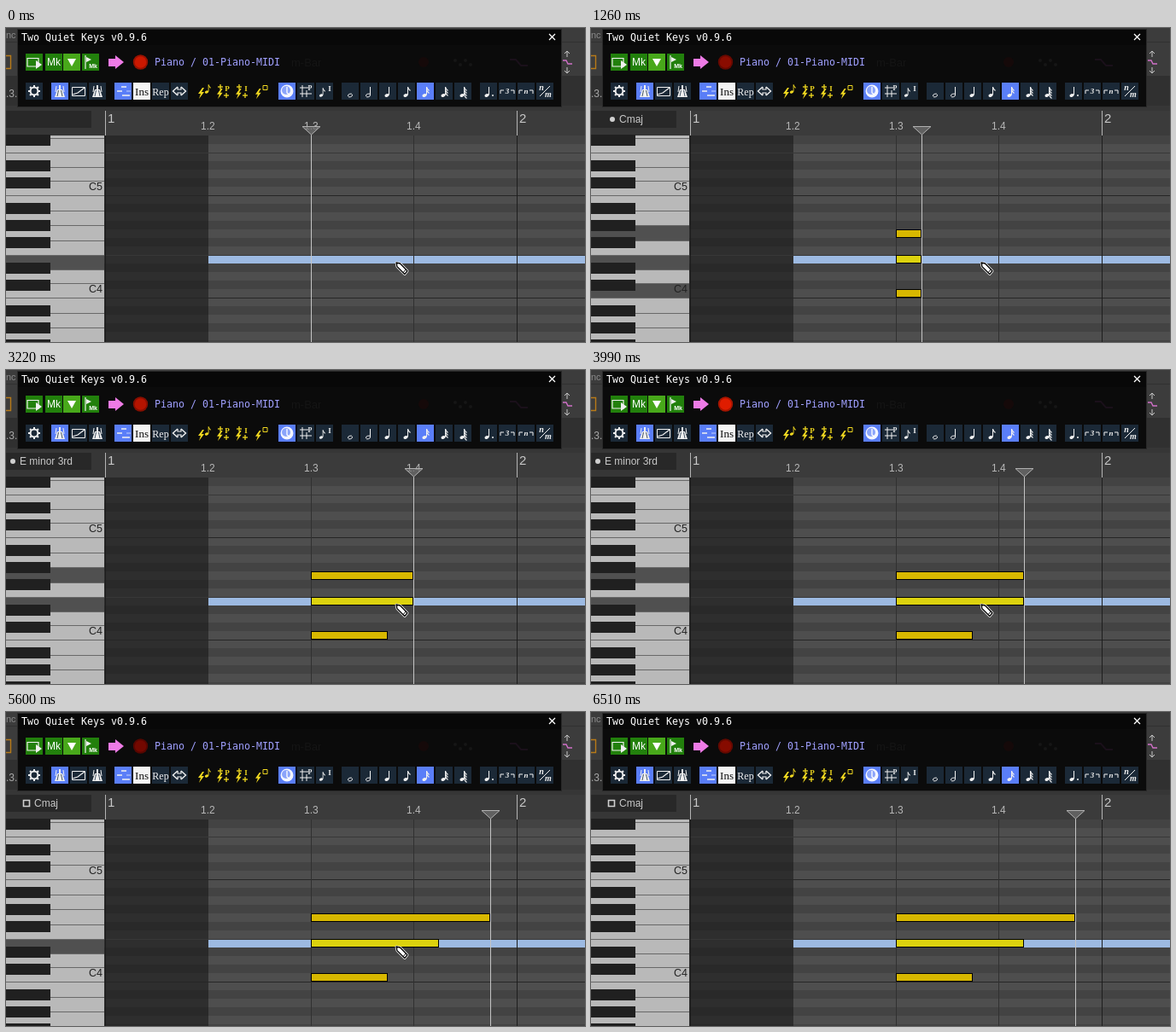
An HTML page with a canvas that plays this animation: 678 by 368 pixels, repeating every 6580 ms.

```html
<!DOCTYPE html>
<html lang="en">
<head>
<meta charset="utf-8">
<title>Step input</title>
<style>
html, body { margin: 0; width: 100%; height: 100%; overflow: hidden; background: #333; }
canvas { display: block; width: 678px; height: 368px; }
</style>
</head>
<body>
<canvas id="stage" width="678" height="368"></canvas>
<script>
const W = 678, H = 368, LOOP = 6580;
const ctx = document.getElementById('stage').getContext('2d');
const SANS = '"Liberation Sans", Arial, sans-serif';
const MONO = '"DejaVu Sans Mono", monospace';
const SERIF = '"Liberation Serif", serif';
const NAVY = '#1b2937', BLUE = '#5a7ef8', INK = '#f0f0f0', YELLOW = '#f0d820';

// The play head advances at a steady rate while keys are held
const FIRST_STEP = 1220, STEP_MS = 640, STEP_COUNT = 7;
const PRESS = 1050, RELEASE_C = 2800, RELEASE_E = 4940, RELEASE_G = 5500;
const STEP_W = 30, START_X = 357, ROLL_Y = 126, KEYS_W = 115, ITEM_X = 237;

const isBlack = p => [1, 3, 6, 8, 10].includes(((p % 12) + 12) % 12);
const rowY = p => 306 - (p - 60) * 10;

function rect(x, y, w, h, color) {
  ctx.fillStyle = color;
  ctx.fillRect(x, y, w, h);
}

function text(s, x, y, font, color, align = 'left') {
  ctx.font = font;
  ctx.fillStyle = color;
  ctx.textAlign = align;
  ctx.fillText(s, x, y);
}

function path(pts, close) {
  ctx.beginPath();
  for (let i = 0; i < pts.length; i += 2) ctx.lineTo(pts[i], pts[i + 1]);
  if (close) ctx.closePath();
}

function fill(pts, color) {
  path(pts, true);
  ctx.fillStyle = color;
  ctx.fill();
}

function line(pts, color = INK, width = 1.3, close = false) {
  path(pts, close);
  ctx.strokeStyle = color;
  ctx.lineWidth = width;
  ctx.stroke();
}

function disc(x, y, r, color) {
  ctx.beginPath();
  ctx.arc(x, y, r, 0, Math.PI * 2);
  ctx.fillStyle = color;
  ctx.fill();
}

function ring(x, y, r, color, width) {
  ctx.beginPath();
  ctx.arc(x, y, r, 0, Math.PI * 2);
  ctx.strokeStyle = color;
  ctx.lineWidth = width;
  ctx.stroke();
}

const button = (x, y, color) => rect(x, y, 20, 20, color);

function noteIcon(x, y, { open = false, stem = true, flags = 0, size = 1, color = INK } = {}) {
  ctx.save();
  ctx.translate(x, y);
  ctx.scale(size, size);
  ctx.beginPath();
  ctx.ellipse(0, 0, 2.6, 1.8, -0.35, 0, Math.PI * 2);
  ctx.fillStyle = ctx.strokeStyle = color;
  ctx.lineWidth = 1;
  if (open) ctx.stroke(); else ctx.fill();
  if (stem) line([2.5, -0.5, 2.5, -10], color, 1);
  for (let i = 0; i < flags; i++) {
    ctx.beginPath();
    ctx.moveTo(2.5, -10 + i * 3);
    ctx.quadraticCurveTo(3, -7.5 + i * 3, 5.5, -5.5 + i * 3);
    ctx.lineWidth = 1.2;
    ctx.stroke();
  }
  ctx.restore();
}

function bolt(x, y, s) {
  fill([x + 5 * s, y, x, y + 7 * s, x + 3 * s, y + 7 * s, x + s, y + 13 * s,
    x + 7 * s, y + 5 * s, x + 4 * s, y + 5 * s, x + 7 * s, y], YELLOW);
}

function plus(x, y, color) {
  line([x - 3, y, x + 3, y], color, 1.3);
  line([x, y - 3, x, y + 3], color, 1.3);
}

function pedal(x, y) {
  fill([x + 7, y + 8, x + 13, y + 8, x + 16, y + 17, x + 4, y + 17], INK);
  line([x + 10, y + 3, x + 10, y + 8], INK, 2);
  line([x + 6, y + 4, x + 5, y + 11], INK, 1);
  line([x + 14, y + 4, x + 15, y + 11], INK, 1);
  line([x + 8.5, y + 9, x + 7, y + 16], '#456', 1);
  line([x + 11.5, y + 9, x + 13, y + 16], '#456', 1);
}

function backdrop() {
  rect(0, 0, W, 97, '#3c3c3c');
  rect(0, 16, W, 1, '#303030');
  rect(0, 56, W, 36, '#303030');
  rect(0, 91, W, 6, '#363636');
  text('nc', 0, 12, '11px ' + SANS, '#8a8a8a');
  line([0, 32.5, 5.5, 32.5, 5.5, 47.5, 0, 47.5], '#b87a18', 1.4);
  text('.3.0', 0, 81, '12px ' + SANS, '#a8a8a8');
  line([657, 27, 657, 34], '#c8c8c8', 1);
  line([654, 30, 657, 27, 660, 30], '#c8c8c8', 1);
  line([657, 46, 657, 53], '#c8c8c8', 1);
  line([654, 50, 657, 53, 660, 50], '#c8c8c8', 1);
  line([652, 38, 656, 38, 658, 42, 663, 42], '#d070c8', 1.4);
}

function topRow(t) {
  const green = '#22800c', bright = '#48a81a';
  button(23, 30, green);
  line([25, 35.5, 38, 35.5, 38, 45, 25, 45], INK, 1.2, true);
  fill([35, 38, 42, 43, 35, 48], INK);
  button(46, 30, green);
  text('Mk', 56, 44, '12px ' + SANS, '#fff', 'center');
  button(67, 30, bright);
  fill([72, 36, 82, 36, 77, 45], '#fff');
  button(89, 30, green);
  line([93, 32, 93, 48], INK, 1.2);
  fill([94, 34, 100, 37, 94, 40], INK);
  text('Mk', 102, 47, 'bold 7px ' + SANS, '#fff', 'center');
  fill([120, 36, 128, 36, 128, 32, 138, 40, 128, 48, 128, 45, 120, 45], '#ee7be6');

  const glow = 0.5 + 0.5 * Math.cos((t - 895) / 1047 * Math.PI * 2);
  const red = k => `rgb(${k * (115 + 110 * glow)}, ${k * (8 + 20 * glow)}, 0)`;
  disc(157.5, 40, 8.7, red(0.75));
  disc(157.5, 40, 6.8, red(1));
  text('Piano / 01-Piano-MIDI', 174, 44, '11.63px ' + MONO, '#a0a0ff');
}

function toolRow() {
  const y = 64;
  for (const x of [23, 75, 97, 171, 193, 341, 363, 393, 415, 437, 459, 503, 525, 555, 577, 599, 621])
    button(x, y, NAVY);
  for (const x of [53, 127, 319, 481]) button(x, y, BLUE);
  button(149, y, '#f4f4f4');

  ring(33, 74, 4.4, INK, 2);
  for (let i = 0; i < 8; i++) {
    const c = Math.cos(i * Math.PI / 4), s = Math.sin(i * Math.PI / 4);
    line([33 + c * 5, 74 + s * 5, 33 + c * 7, 74 + s * 7], INK, 2);
  }

  pedal(53, y);
  line([77.5, 69.5, 92.5, 69.5, 92.5, 79.5, 77.5, 79.5], INK, 1, true);
  line([78, 78, 84, 76, 92, 70], INK, 1.2);
  pedal(97, y);

  line([130, 74, 136, 74], INK, 1.5);
  line([135, 69, 141, 69], INK, 1.5);
  line([136, 79, 145, 79], INK, 1.5);
  line([141, 74, 146, 74], '#c4d0ff', 1);
  text('Ins', 159, 79, '13px ' + SERIF, '#111', 'center');
  text('Rep', 181, 79, '12px ' + SERIF, INK, 'center');
  line([201, 69, 195.5, 74, 201, 79], INK, 1.4);
  line([205, 69, 210.5, 74, 205, 79], INK, 1.4);
  line([201, 69, 201, 72, 205, 72, 205, 69], INK, 1.2);
  line([201, 79, 201, 76, 205, 76, 205, 79], INK, 1.2);

  bolt(225, 70, 1);
  noteIcon(235, 75, { flags: 1, size: 0.85, color: YELLOW });
  for (const [x, s] of [[247, 'P'], [269, 'I']]) {
    bolt(x, 71, 0.95);
    plus(x + 4, 69, YELLOW);
    text(s, x + 12, 74, 'bold 9px ' + SERIF, YELLOW, 'center');
    plus(x + 11, 79, YELLOW);
  }
  bolt(292, 71, 0.95);
  line([301, 67.5, 306, 67.5, 306, 72.5, 301, 72.5], YELLOW, 1, true);

  disc(329, 74, 7.5, '#f4f6ff');
  disc(328, 73, 5, '#8ba4fa');
  line([329, 69, 329, 76, 332, 78], '#fff', 1.3);
  line([344, 70, 354, 70], INK, 1);
  line([344, 77, 358, 77], INK, 1);
  line([347, 67, 347, 81], INK, 1);
  line([352, 73, 352, 81], INK, 1);
  text('P', 356, 73, 'bold 8px ' + SERIF, INK, 'center');
  noteIcon(369, 79, { flags: 1, size: 0.85 });
  text('I', 379, 74, 'bold 9px ' + SERIF, INK, 'center');

  noteIcon(403, 79, { open: true, stem: false });
  noteIcon(424, 79, { open: true });
  for (let i = 0; i < 5; i++) noteIcon(446 + i * 22, 79, { flags: i });
  noteIcon(563, 79);
  disc(570, 79, 1, INK);
  for (const [x, s] of [[577, '3'], [599, 'n']]) {
    line([x + 2, 77, x + 2, 73, x + 6, 73], INK, 1);
    line([x + 14, 73, x + 18, 73, x + 18, 77], INK, 1);
    text(s, x + 10, 77, 'italic bold 9px ' + SERIF, INK, 'center');
  }
  text('n', 627, 73, 'italic bold 10px ' + SERIF, INK, 'center');
  text('m', 635, 81, 'italic bold 10px ' + SERIF, INK, 'center');
  line([625, 80, 637, 68], INK, 1);
}

function toolWindow(t) {
  rect(13, 1, 638, 92, '#292929');
  rect(14, 2, 636, 90, '#0b0b0b');
  rect(14, 2, 636, 18, '#080808');
  text('m-Bar', 334, 45, '13px ' + SANS, '#151515');
  disc(489, 40, 6, '#150909');
  for (let i = 0; i < 4; i++) disc(526 + i * 6, 38 + (i % 2) * 5, 2, '#161616');
  line([590, 37, 597, 37, 603, 44, 611, 44], '#1a101a', 2);
  text('Two Quiet Keys v0.9.6', 18, 15, '11.63px ' + MONO, '#fff');
  line([636, 7, 643, 14], '#fff', 1.3);
  line([643, 7, 636, 14], '#fff', 1.3);
  topRow(t);
  toolRow();
}

function ruler(t) {
  rect(0, 97, W, ROLL_Y - 97, '#3b3b3b');
  rect(0, 93, 116, ROLL_Y - 93, '#363636');
  rect(0, 97, 100, 20, '#282828');
  rect(116, 97, 1, 29, '#b4b4b4');
  rect(598, 97, 1, 29, '#b4b4b4');
  text('1', 119, 111, '15px ' + SANS, '#c8c8c8');
  text('2', 601, 111, '15px ' + SANS, '#c8c8c8');
  ['1.2', '1.3', '1.4'].forEach((s, i) =>
    text(s, [228, 349, 469][i], 119, '12px ' + SANS, '#b8b8b8'));

  if (t < PRESS) return;
  const released = t >= RELEASE_E;
  const third = t >= RELEASE_C && !released;
  if (released) line([20.5, 103.5, 27.5, 103.5, 27.5, 110.5, 20.5, 110.5], '#d0d0d0', 1.6, true);
  else disc(third ? 8 : 25, 107, 3, '#d0d0d0');
  text(third ? 'E minor 3rd' : 'Cmaj', third ? 16 : 33, 111, '12px ' + SANS, '#c8c8c8');
}

// Pitches lit on the keyboard: the hovered one and the held ones
function litKeys(t) {
  const keys = [];
  if (t < 6090) keys.push(64);
  else if (t < 6230) keys.push(62);
  if (t >= PRESS && t < RELEASE_C) keys.push(60);
  if (t >= PRESS && t < RELEASE_G) keys.push(67);
  return keys;
}

// White keys share C–E (50 px) and F–B (70 px) evenly
function whiteKey(p) {
  const octave = Math.floor(p / 12), n = p % 12;
  const h = n < 5 ? 50 / 3 : 17.5;
  const i = n < 5 ? n / 2 : (n - 5) / 2;
  const base = rowY(octave * 12 + (n < 5 ? 0 : 5)) + 10;
  return [Math.round(base - (i + 1) * h), Math.round(base - i * h)];
}

function keyboard(t) {
  const lit = litKeys(t);
  rect(0, ROLL_Y, KEYS_W, H - ROLL_Y, '#b9b9b9');
  for (let p = 53; p <= 79; p++) {
    if (isBlack(p)) continue;
    const [top, bottom] = whiteKey(p);
    if (lit.includes(p)) rect(0, top, KEYS_W, bottom - top, '#505050');
    rect(0, bottom, KEYS_W, 1, '#686868');
  }
  for (let p = 54; p <= 78; p++)
    if (isBlack(p)) rect(0, rowY(p) - 1, 52, 13, '#202020');
  text('C5', 113, 190, '12.5px ' + SANS, '#222', 'right');
  text('C4', 113, 310, '12.5px ' + SANS, '#222', 'right');
}

function grid() {
  for (let p = 53; p <= 78; p++) {
    const y = rowY(p), dark = isBlack(p);
    rect(KEYS_W, y, ITEM_X - KEYS_W, 10, dark ? '#292929' : '#2e2e2e');
    rect(ITEM_X, y, W - ITEM_X, 10, dark ? '#434343' : '#4e4e4e');
  }
  for (let p = 53; p <= 78; p++) {
    if (p % 12 === 0) rect(KEYS_W, rowY(p) + 10, W, 1, '#262626');
    if (p % 12 === 5) rect(KEYS_W, rowY(p) + 10, W, 1, '#383838');
  }
  rect(ITEM_X, 267, W - ITEM_X, 9, '#9dbae2');
  for (const x of [357, 477]) rect(x, ROLL_Y, 1, H - ROLL_Y, '#303030');
  for (const x of [116, 598]) rect(x, ROLL_Y, 1, H - ROLL_Y, '#1d1d1d');
}

function chord(count) {
  if (!count) return;
  for (const [p, max, color] of [[67, 7, '#d8b800'], [64, 5, '#dcd20e'], [60, 3, '#d8b800']]) {
    const w = Math.min(count, max) * STEP_W;
    rect(START_X, rowY(p), w, 10, '#000');
    rect(START_X + 1, rowY(p) + 1, w - 2, 8, color);
  }
}

function playHead(x) {
  rect(x, 125, 1, H - 125, '#c4c4c4');
  const tri = [x - 10, 115.5, x + 11, 115.5, x + 0.5, 125];
  fill(tri, 'rgba(110,110,110,.75)');
  line(tri, '#b0b0b0', 1, true);
}

function pencil(t) {
  const k = Math.max(0, (t - 5880) / 280) ** 2;
  ctx.save();
  ctx.translate(457 - 46 * k, 275 + 69 * k);
  ctx.lineJoin = 'round';
  const body = [0, 0, 4.5, 1, 13, 9.8, 9.8, 13.5, 1, 4.8];
  line(body, '#fff', 2.8, true);
  fill(body, '#fff');
  line(body, '#000', 1.3, true);
  fill([0, 0, 2.5, 0.5, 0.5, 2.5], '#000');
  line([8.2, 11.5, 11.2, 8], '#000', 1);
  ctx.restore();
}

function draw(t) {
  const passed = Math.floor((t - FIRST_STEP) / STEP_MS) + 1;
  const count = Math.min(STEP_COUNT, Math.max(0, passed));
  backdrop();
  ruler(t);
  grid();
  chord(count);
  keyboard(t);
  playHead(START_X + count * STEP_W);
  toolWindow(t);
  pencil(t);
}

const begin = performance.now();
function tick(now) {
  draw(Math.max(0, now - begin) % LOOP);
  requestAnimationFrame(tick);
}
draw(0);
requestAnimationFrame(tick);
</script>
</body>
</html>
```
